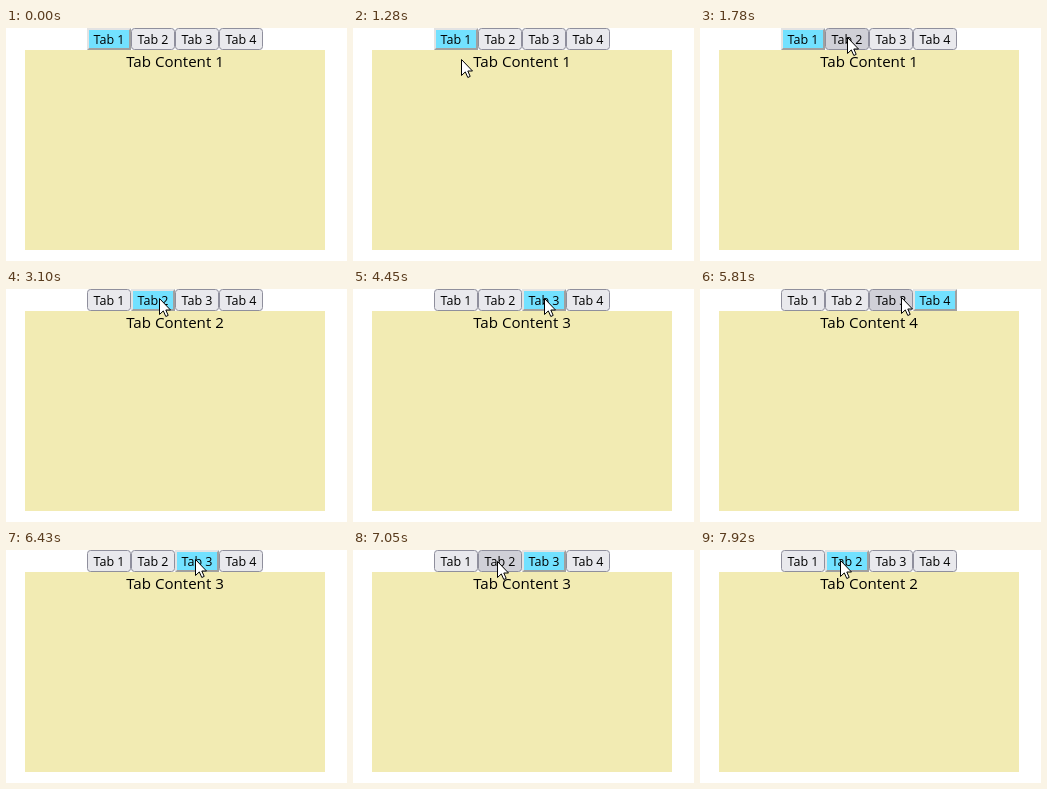
Recreate the animation shown at these times as an HTML page. Size 341 px wide and 233 px high, loop 7990 ms.

```html
<!DOCTYPE html>
<html lang="en">
<head>
<meta charset="utf-8">
<title>Tabs</title>
<style>
  html, body { margin: 0; width: 100%; height: 100%; overflow: hidden; background: #fff; }
  svg { display: block; width: 341px; height: 233px; }
  text { font-family: "Open Sans", "Noto Sans", sans-serif; fill: #000; text-anchor: middle; }
  .tab text { font-size: 12.5px; }
  #title { font-size: 15.1px; }
</style>
</head>
<body>
<svg viewBox="0 0 341 233">
  <rect x="19" y="22" width="300" height="200" fill="#f2ebb3"/>
  <text id="title" x="169" y="39"></text>
  <g id="tabs"></g>
  <path id="cursor" d="M.5 .5V16.5L4.3 12.9 6.8 18.5 9.2 17.4 6.8 12H11.5Z" fill="#fff" stroke="#000"/>
</svg>
<script>
const LOOP = 7990, STEP = 70, LEFT = 81, TAB_W = 44, TAB_H = 22;
const ENTRY = { x: 218, y: 289 };
const title = document.getElementById("title");
const cursor = document.getElementById("cursor");

// Each move starts where the last one ended; click is the release time, if any
const moves = [
  { at: 790, steps: 12, x: 102, y: 17, power: 2.7 },
  { at: 1630, steps: 3, x: 147, y: 9, click: 2510 },
  { at: 3100, steps: 6, x: 184, y: 9, click: 3850 },
  { at: 4450, steps: 6, x: 227, y: 7, click: 5060 },
  { at: 5260, steps: 1, x: 226, y: 7 },
  { at: 5460, steps: 9, x: 189, y: 9, click: 6430 },
  { at: 6630, steps: 7, x: 144, y: 11, click: 7520 },
  { at: 7920, steps: 1, x: 140, y: 10 }
];

const tabAt = p => p && p.y < TAB_H ? Math.floor((p.x - LEFT) / TAB_W) : -1;

function pointer(t) {
  const i = moves.findLastIndex(m => m.at <= t);
  if (i < 0) return null;
  const from = moves[i - 1] || ENTRY;
  const { at, steps, x, y, power = 1 } = moves[i];
  const step = Math.min(steps, Math.floor((t - at) / STEP) + 1);
  const left = (1 - step / steps) ** power;
  return { x: Math.round(x + (from.x - x) * left), y: Math.round(y + (from.y - y) * left) };
}

const tabs = [0, 1, 2, 3].map(i => {
  const g = document.createElementNS("http://www.w3.org/2000/svg", "g");
  g.setAttribute("class", "tab");
  g.setAttribute("transform", `translate(${LEFT + i * TAB_W})`);
  g.innerHTML = `
    <rect class="plain" x=".5" y=".5" width="43" height="21" rx="3" stroke="#8f8f9d"/>
    <g class="raised">
      <path d="M0 0H44L42 2H2V20L0 22Z" fill="#e3e3e3"/>
      <path d="M44 0V22H0L2 20H42V2Z" fill="#a0a0a0"/>
      <rect x="2" y="2" width="40" height="18" fill="#72e1ff"/>
    </g>
    <text x="22" y="16">Tab ${i + 1}</text>`;
  document.getElementById("tabs").append(g);
  return { plain: g.querySelector(".plain"), raised: g.querySelector(".raised") };
});

function render(t) {
  const pos = pointer(t);
  const hover = tabAt(pos);
  const last = moves.findLast(m => m.click <= t);
  const active = last ? tabAt(last) : 0;
  const pressing = moves.some(m => t >= m.click - STEP && t < m.click);
  const hoverFill = pressing ? "#b1b1b9" : "#d0d0d7";

  tabs.forEach(({ plain, raised }, i) => {
    plain.style.display = i === active ? "none" : "";
    raised.style.display = i === active ? "" : "none";
    plain.setAttribute("fill", i === hover ? hoverFill : "#e9e9ed");
  });
  title.textContent = `Tab Content ${active + 1}`;
  cursor.style.display = pos ? "" : "none";
  if (pos) cursor.setAttribute("transform", `translate(${pos.x} ${pos.y})`);
}

const origin = performance.now();
function tick() {
  render((performance.now() - origin) % LOOP);
  requestAnimationFrame(tick);
}
tick();
</script>
</body>
</html>
```
